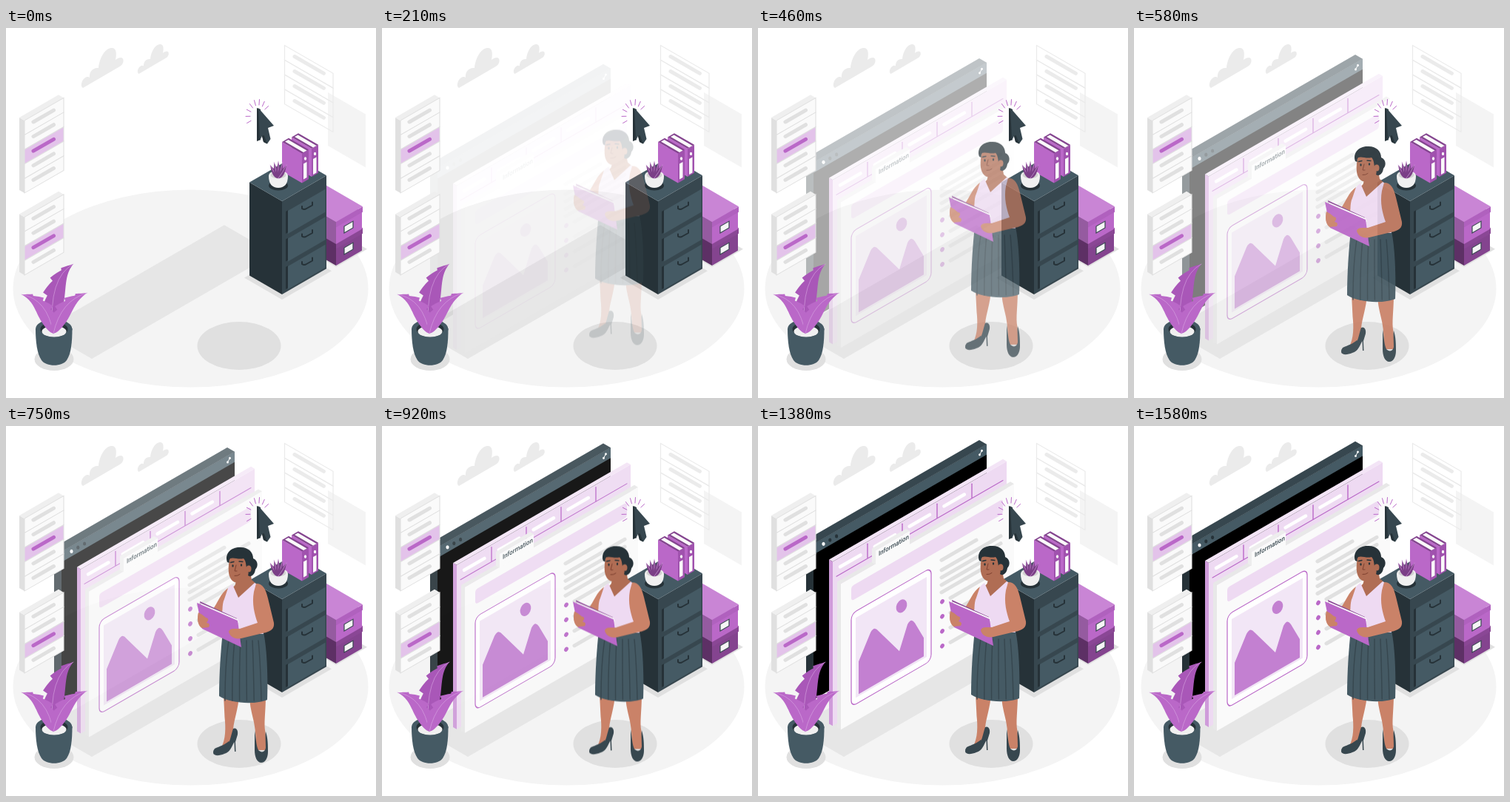
Recreate the animation shown at these times as an HTML page. Size 500 px wide and 500 px high, loop 1620 ms.

```html
<!DOCTYPE html>
<html lang="en">
<head>
<meta charset="utf-8">
<title>Information window</title>
<style>
html, body { margin: 0; width: 100%; height: 100%; overflow: hidden; background: #fff; }
svg { display: block; width: 100vw; height: 100vh; }
text { font: 500 9px Roboto, "Liberation Sans", sans-serif; }
</style>
</head>
<body>
<svg id="stage" viewBox="0 0 500 500"></svg>
<script>
const PURPLE = '#ba68c8', PLUM = '#a052ae', GRAPE = '#84448f', PINK = '#eedaf2', LILAC = '#c380d1';
const DARK = '#263238', SLATE = '#37474f', STEEL = '#455a64';
const GREY = '#e0e0e0', PALE = '#ebebeb', PAPER = '#fafafa', SKIN = '#ca8268', FACE = '#b06d54';
const K = Math.tan(Math.PI / 6); // isometric slope

const poly = (pts, fill, extra = '') => `<polygon points="${pts}" fill="${fill}" ${extra}/>`;
const path = (d, fill) => `<path d="${d}" fill="${fill}"/>`;
const line = (d, color, w = 1) =>
  `<path d="${d}" fill="none" stroke="${color}" stroke-width="${w}" stroke-linecap="round" stroke-linejoin="round"/>`;
const oval = (x, y, rx, ry, fill, turn = 0) =>
  `<ellipse rx="${rx}" ry="${ry}" fill="${fill}" transform="translate(${x} ${y}) rotate(${turn})"/>`;
const rows = (n, fn) => Array.from({ length: n }, (_, i) => fn(i)).join('');

// Upright isometric face; slope -1 climbs to the right, 1 falls
const skew = (x, y, slope, body) => `<g transform="matrix(1 ${slope * K} 0 1 ${x} ${y})">${body}</g>`;
const face = (x, y, w, h, fill, slope = -1, extra = '') =>
  skew(x, y, slope, `<rect width="${w}" height="${h}" fill="${fill}" ${extra}/>`);
// Flat diamond with its front corner at x, y
const flat = (x, y, a, b, fill) =>
  poly([x, y, x - a, y - a * K, x - a + b, y - (a + b) * K, x + b, y - b * K], fill);
const block = (x, y, a, b, h, left, right, top) =>
  face(x - a, y - a * K, a, h, left, 1) + face(x, y, b, h, right) + flat(x, y, a, b, top);
const pill = (x, y, w, color, slope = -1, thick = 5) => line(`M${x} ${y}l${w} ${slope * K * w}`, color, thick);

// Leaf along a quadratic rib: smooth on one side, lobed on the other
function leaf([x0, y0], [cx, cy], [x1, y1], width, fill, lobes = 0) {
  const edge = (t, side) => {
    const u = 1 - t;
    const dx = u * (cx - x0) + t * (x1 - cx), dy = u * (cy - y0) + t * (y1 - cy), d = Math.hypot(dx, dy);
    const cut = side < 0 ? 1 - 0.5 * (t * lobes % 1) : 1;
    const w = side * cut * width * Math.sin(Math.PI * t ** 0.65) / d;
    return [u * u * x0 + 2 * u * t * cx + t * t * x1 + dy * w, u * u * y0 + 2 * u * t * cy + t * t * y1 - dx * w];
  };
  const pts = [];
  for (let i = 0; i <= 40; i++) pts.push(edge(i / 40, 1));
  for (let i = 40; i >= 0; i--) pts.push(edge(i / 40, -1));
  return poly(pts, fill) + line(`M${x0} ${y0}Q${cx} ${cy} ${x1} ${y1}`, '#d9a8e2', 0.6);
}

const floor = () =>
  oval(249.5, 352, 240, 133.5, '#f4f4f4') + flat(116, 447, 67, 246, '#e6e6e6') + oval(315, 429.5, 56.5, 32.5, GREY);

function clouds() {
  const cloud = path('M104 81C100 79 102 71 106 68C109 65 112 66 113 67C112 60 117 53 125 54C126 42 133 28 142 27C149 26 150 34 148 43C153 39 158 39 158.5 43C159 48 156 51 152 53Z', PALE);
  return cloud + `<g transform="translate(102.5 2) scale(.74)">${cloud}</g>`;
}

const wallNotes = () =>
  face(435, 87, 51, 72, '#f4f4f4', 1) +
  rows(4, i => face(376.5, 23.5 + i * 19.8, 65.5, 19.8, 'none', 1, `stroke="${PALE}" stroke-width="1.3"`) +
    pill(390, 38.5 + i * 20, 39.5, PALE, 1));

// Left list card with n rows, the third one highlighted
function listCard(y, n) {
  const step = 19.6;
  return block(25, y, 7, 53, n * step, GREY, PAPER, '#efefef') +
    rows(n, i => face(25, y + i * step, 53, step, i === 2 ? '#e3c3ea' : PAPER, -1, `stroke="${GREY}" stroke-width="1.1"`) +
      pill(37, y + 2 + i * step, 27.5, i === 2 ? PURPLE : GREY));
}

const plant = () =>
  oval(65, 447.5, 26.5, 15.5, GREY) +
  path('M40 406C40 425 42 440 48 449C54 458 76 458 82 449C88 440 89.5 425 89.5 406Z', STEEL) +
  oval(64.7, 407, 24.8, 13.5, STEEL) + oval(65, 407, 18.5, 9.5, DARK) + oval(65, 410, 16.5, 7.5, '#f0f0f0') +
  leaf([63, 410], [57, 337], [91, 319], -15, '#a957b8', 5) +
  leaf([64, 413], [56, 366], [21, 360], 12, PURPLE, 5) +
  leaf([64, 413], [74, 368], [109.5, 358], -12, PURPLE, 5);

const storageBox = (y, lid, side, dark, top) =>
  block(446, y + 6, 50, 35, 24, dark, side, side) +
  block(446, y, 50, 36, 7.5, dark, lid, top) +
  face(457, y + 6, 12, 9, '#f5f5f5', -1, `stroke="${SLATE}" stroke-width="1.2"`);

const boxes = () =>
  flat(446, 323, 60, 42, GREY) +
  storageBox(291, '#8a4795', GRAPE, '#5d3065', GRAPE) +
  storageBox(262, '#b061be', PURPLE, '#955ba0', '#c985d5');

const cabinet = () =>
  flat(373, 367, 51, 67, GREY) +
  block(373, 234, 44, 60, 126, DARK, SLATE, STEEL) +
  rows(3, i => {
    const y = 247 + i * 37.5;
    return face(378, y + 1, 3, 30, DARK) + face(381, y, 50.5, 31, STEEL) +
      line(`M400 ${y - 6}v3q3 2 6 0l8 -4.5v-4`, DARK, 2);
  });

const binder = (x, y, h) =>
  block(x, y, 27, 9, h, PURPLE, PLUM, GRAPE) +
  flat(x + 2, y - 1.5, 25, 4.5, PAPER) +
  face(x + 2, y + 14, 4.5, 21, PAPER) + oval(x + 4.5, y + 7, 1.6, 2.2, PAPER);

const bowl = () =>
  oval(368, 213, 13, 6.5, DARK) +
  path('M355 200C355 211 360 216 368 216C376 216 381 211 381 200C381 190 355 190 355 200Z', '#f0f0f0') +
  oval(368, 198.5, 10.5, 5, '#d2d2d2') +
  rows(5, i => {
    const a = (i - 2) * 0.34;
    return leaf([368, 203], [368 + 9 * a, 195], [368 + 25 * Math.sin(a) * 0.7, 203 - 23 * Math.cos(a)], 3.2, '#7b3f87');
  });

const cursor = () =>
  poly('339,108 344,110 344,151 339,153', DARK) +
  poly('341,108 362,132 354,135 357.5,150 353,156.5 348,154 346,146 343,152', SLATE) +
  poly('346,146 348.5,145 353,156.5 348,154', DARK) +
  rows(8, i => {
    const a = (155 + i * 24) * Math.PI / 180, c = Math.cos(a), s = Math.sin(a);
    return line(`M${341 + 11 * c} ${119 + 15 * s}L${341 + 17 * c} ${119 + 22.5 * s}`, PURPLE);
  });

const screen = () =>
  block(75, 161.5, 10, 234, 210, DARK, '#000', SLATE) +
  face(75, 161.5, 234, 14, STEEL) +
  rows(3, i => oval(88.5 + i * 8.8, 161 - i * 5.2, 2.1, 2.6, i ? DARK : '#fff')) +
  line('M299.5 40.5L302.5 35', '#fff') + oval(299.5, 40.5, 1.4, 1.6, '#fff') + oval(302.5, 35, 1.4, 1.6, '#fff');

const tabs = () =>
  block(101, 185, 5, 235, 222, '#cf9bda', PINK, '#f3e4f6') +
  pill(106, 205, 225, PURPLE, -1, 1.1) +
  rows(4, i => line(`M${148 + i * 47} ${161 - i * 27}v19`, PURPLE, 1.4) +
    pill(111 + i * 46.8, 192 - i * 27.3, 27.5, '#fff', -1, 4.5));

const picture = () =>
  face(126, 255.5, 108, 125.5, '#fff', -1, `rx="7" ry="8" stroke="${PURPLE}" stroke-width="1.2"`) +
  face(132, 261, 96, 108, '#f2e6f6') +
  path('M136 364V320L152 281Q157 271 163 279L191 306L202 270Q207 260 212 268L224 288V313Z', LILAC) +
  oval(194, 245, 6.8, 9.5, LILAC, 25);

const page = () =>
  block(112, 215, 5, 234, 197, '#e8e8e8', PAPER, '#e8e8e8') +
  block(159, 170, 5, 46, 19, '#ededed', PAPER, '#ededed') +
  skew(163, 177.5, -1, `<text fill="${SLATE}" transform="scale(.866 1)">Information</text>`) +
  face(126, 218.5, 205, 20, PINK, -1, 'rx="3.5" ry="4"') +
  picture() +
  pill(248, 183, 47, GREY) +
  rows(4, i => pill(248, 196.5 + i * 10, 80, GREY) +
    oval(249, 239 + i * 20, 2.6, 3.5, PURPLE, 30) + pill(260, 234 + i * 20, 68, GREY));

const legs = () =>
  path('M294 362H315C314 380 308 395 307 408L303 425L291 432C297 422 297 405 295.5 392Z', SKIN) +
  path('M329 362H351C351 385 348 400 350.5 412L352 436H338C338 420 337 406 334 394C331 382 329 372 329 362Z', SKIN) +
  path('M282 434C289 431 297 428 301 424C302 428 305 412 307 407C311 405 314 409 313 415L310 425L310.5 438H309L308.5 425C305 431 303 439 295 441C288 444 281 444 280 440Q280 436 282 434Z', SLATE) +
  path('M336 410C338 420 338 430 341 436C345 440 350 439 351 433C351 422 350 416 351 411C354 420 354 430 354 438C354 447 350 453 345 453C339 453 336 445 336 436Z', SLATE);

const skirt = () =>
  path('M293 276L348 277C353 300 354 340 353 368C338 375 302 373 288 363C288 335 290 303 293 276Z', STEEL) +
  rows(6, i => line(`M${301 + i * 8} 288Q${296 + i * 9.6} 320 ${296 + i * 9.8} 369`, SLATE, 1.4));

const head = () =>
  path('M311 203L329 190L332 206L340 213C332 224 322 230 314 231L304 217Q312 215 311 203Z', FACE) +
  path('M302 177C300 190 300 199 304 205C309 212 317 210 322 207L333 198L334 176L314 169Z', FACE) +
  path('M299 182C295 171 304 161 317 162C328 162 334 169 334 177C341 180 341 188 337 192C336 200 330 203 327 200C329 195 326 193 325 189C324 184 324 180 321 177C314 179 308 175 303 177Q301 179 302 183Z', DARK) +
  oval(328, 191, 3.5, 4.5, FACE) +
  oval(306.5, 187, 1.2, 1.7, DARK) + oval(318, 186, 1.2, 1.7, DARK) +
  line('M303.5 182.5L308 181.5M315 181L320 181.5', DARK, 1.3) +
  line('M311 186L309 194H312M309 200.5Q313 201 316 198.5', '#7d4030');

const shirt = () =>
  path('M302 215L306 212L314 230L336 210L343 214C336 230 336 242 339 253L348 279H293L297 252L290 246C292 233 296 222 302 215Z', PINK);

const arms = () =>
  path('M300 217C290 224 286 237 280 245L262 252C257 257 259 269 266 272L290 262C294 250 291 240 295 232Z', SKIN) +
  poly('262,235 312,258 316,290 268,269', '#8a4795') +
  poly('262,237 313,259 315,264 266,244', PAPER) +
  poly('258,237 313,261 318,297 265,272', PURPLE) +
  path('M260 250C258 256 259 267 265 271L274 270Q277 265 271 264Q276 258 270 257Q266 253 260 250Z', SKIN) +
  path('M338 211C347 211 351 218 354 231L362 264C363 272 358 276 347 278L318 285C309 287 302 282 301 276C302 271 309 272 316 272L340 264C336 253 332 238 335 222Z', SKIN);

const stage = document.getElementById('stage');
stage.innerHTML =
  floor() + clouds() + wallNotes() +
  `<g id="win">${screen() + tabs() + page()}</g>` +
  listCard(125, 5) + listCard(255.5, 4) + plant() +
  boxes() + cabinet() + binder(413, 163, 38) + binder(400, 169.5, 40) + bowl() + cursor() +
  `<g id="woman">${legs() + skirt() + head() + shirt() + arms()}</g>`;

const LOOP = 1620, SPRING = 'cubic-bezier(.36,-.01,.5,1.38)';

// Fade and slide in from dy, then rest until the loop restarts
function enter(id, dy, ms) {
  const rest = { opacity: 1, transform: 'translateY(0px)' };
  document.getElementById(id).animate([
    { opacity: 0, transform: `translateY(${dy}px)`, easing: SPRING },
    { ...rest, offset: ms / LOOP },
    rest
  ], { duration: LOOP, iterations: Infinity });
}
enter('win', 30, 1540);
enter('woman', -30, 940);
</script>
</body>
</html>
```
